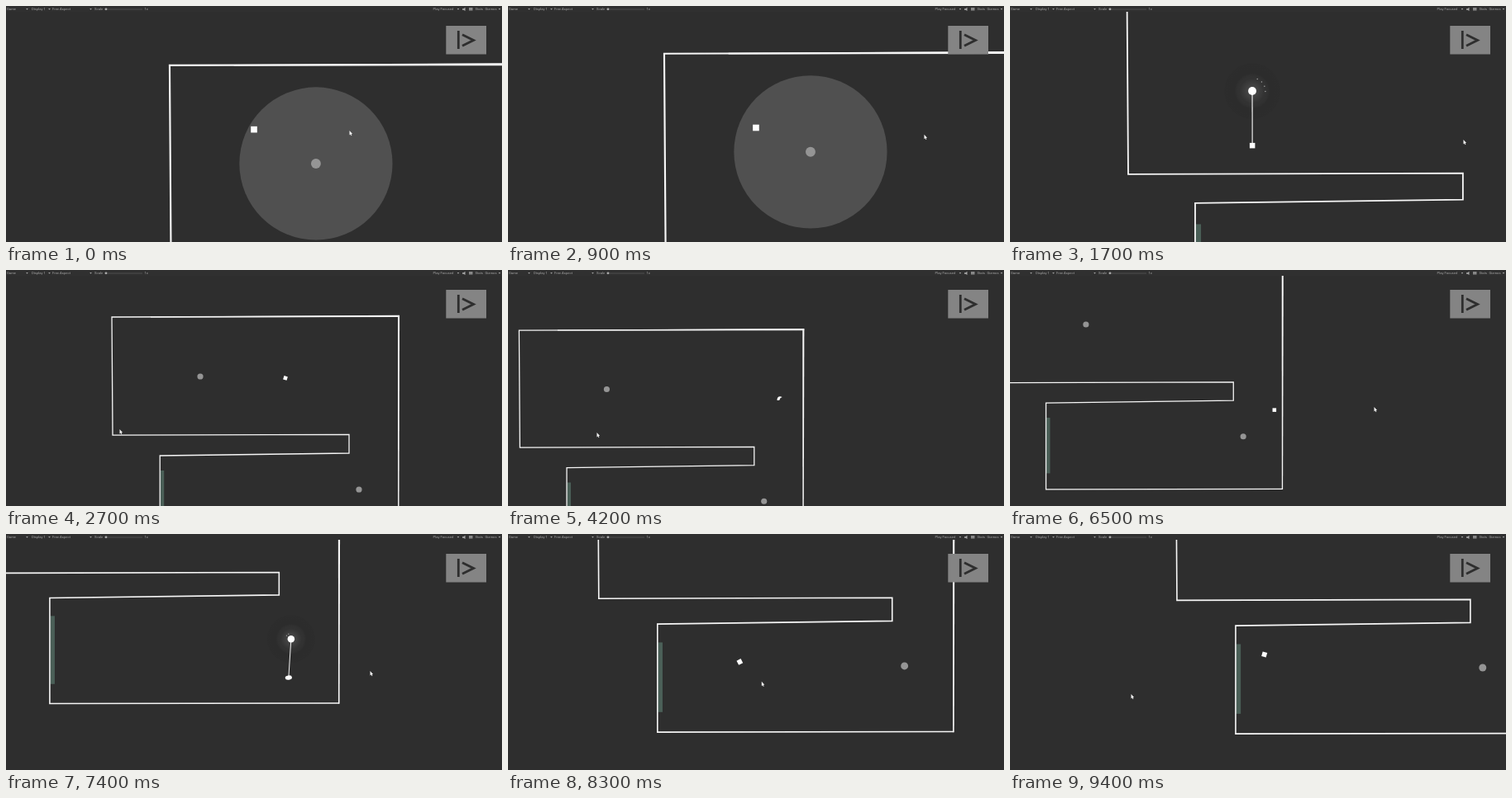
An HTML page with a canvas for the animation above (9.5 s loop, 600 px wide and 286 px high).

```html
<!DOCTYPE html>
<html lang="en">
<head>
<meta charset="utf-8">
<title>Swing</title>
<style>
  html, body { margin: 0; width: 100%; height: 100%; overflow: hidden; background: #2e2e2e; }
  canvas { display: block; }
</style>
</head>
<body>
<canvas id="stage" width="600" height="286"></canvas>
<script>
const ctx = document.getElementById('stage').getContext('2d');
const LOOP = 9500, STEP = 100, BAR = 7;
const CENTER = { x: 300, y: 146.5 };
const BG = '#2e2e2e', WHITE = '#f6f6f6', GREY = '#959595';
const WALL = { left: -44, right: 230 };
const GRAVITY = 18;

// Each anchor swings the player from one angle (degrees) and rope length to another.
const anchors = [
  { x: 0, y: 0, from: 1.1, to: 2, angle: [200, 12], rope: [41, 53.8], power: 1.32, sparks: 4 },
  { x: 192, y: 137, from: 6.7, to: 7.65, angle: [-27.6, 163], rope: [42.9, 35.2], power: 1.48, sparks: 2 }
];

// Key points: [seconds, x, y]
const cameraPath = [
  [0, -45.3, -26.9], [1, -38.8, -16.7], [1.7, 4.9, 30.7], [2.7, 65, 17.5], [4.2, 182.2, 2],
  [5, 207, 21], [6.5, 210, 81.2], [7.4, 155, 152.9], [8, 72.8, 127], [9.4, -27, 124.5]
];
const cursorPath = [
  [0, 416, 152], [1.7, 549, 163], [2.7, 138, 194], [4.2, 108, 198],
  [6.5, 441, 167], [7.4, 441, 167], [9, 147, 195]
];

const clamp01 = v => Math.min(1, Math.max(0, v));
const lerp = ([a, b], u) => a + (b - a) * u;
const smooth = (t, from, to) => {
  const u = clamp01((t - from) / (to - from));
  return u * u * (3 - 2 * u);
};

// Monotone cubic through the key points
function follow(path, t) {
  const last = path.length - 1;
  let i = 0;
  while (i < last - 1 && t >= path[i + 1][0]) i++;
  const slope = (n, c) => (path[n + 1][c] - path[n][c]) / (path[n + 1][0] - path[n][0]);
  const tangent = (n, c) => {
    const p = slope(Math.max(0, n - 1), c), q = slope(Math.min(n, last - 1), c);
    return p * q <= 0 ? 0 : 2 * p * q / (p + q);
  };
  const a = path[i], b = path[i + 1], h = b[0] - a[0];
  const u = clamp01((t - a[0]) / h), w = 1 - u;
  return [1, 2].map(c => a[c] * w * w * (1 + 2 * u) + b[c] * u * u * (3 - 2 * u)
    + h * u * w * (w * tangent(i, c) - u * tangent(i + 1, c)));
}

const zoomAt = t => 1.654 - 0.663 * smooth(t, 0.93, 2.83) + 0.25 * smooth(t, 6.5, 7.64);
const arc = (t, apexTime, apexY) => apexY + GRAVITY / 2 * (t - apexTime) ** 2;
const isHeld = (a, t) => t >= a.from && t < a.to;

function swing(a, t) {
  const u = (t - a.from) / (a.to - a.from);
  const angle = lerp(a.angle, u ** a.power) * Math.PI / 180;
  const rope = lerp(a.rope, u * u);
  return [a.x + rope * Math.cos(angle), a.y + rope * Math.sin(angle)];
}

function playerAt(t) {
  const [first, second] = anchors;
  const held = anchors.find(a => isHeld(a, t));
  if (held) return swing(held, t);
  if (t < first.from) return [-45.3 + 6 * t, arc(t, 0, -25)];
  if (t < second.from) return [Math.min(WALL.right, 103 + 72 * (t - 2.7)), arc(t, 3.1, 0.5)];
  const bounce = 9;
  const left = clamp01((bounce - t) / (bounce - second.to));
  const x = t < bounce ? lerp([WALL.left, 158], left ** 1.5) : WALL.left + 58 * (t - bounce);
  return [x, arc(t, 9.3, 124)];
}

function fillPath(points, fill) {
  ctx.fillStyle = fill;
  ctx.beginPath();
  points.forEach(([x, y]) => ctx.lineTo(x, y));
  ctx.fill();
}

function stroke(points, width, color) {
  ctx.strokeStyle = color;
  ctx.lineWidth = width;
  ctx.beginPath();
  points.forEach(([x, y]) => ctx.lineTo(x, y));
  ctx.stroke();
}

function disc(x, y, r, fill, ry = r, tilt = 0) {
  ctx.fillStyle = fill;
  ctx.beginPath();
  ctx.ellipse(x, y, r, ry, tilt, 0, 7);
  ctx.fill();
}

function drawRoom() {
  ctx.fillStyle = '#4a5f57';
  ctx.fillRect(-48.5, 114, 4.7, 68);
  stroke([[240, -73], [-107, -72], [-106, 71.2], [180, 70.4], [180, 93],
    [-48.8, 96], [-48.8, 201.6], [240, 201.1]], 1.3, WHITE);
  // The top and right walls widen toward their shared corner
  fillPath([[-60, -72.6], [241, -74.2], [241, -72], [-60, -71.6]], WHITE);
  fillPath([[239, -74], [241.1, -74], [240.4, 201.7], [239.1, 201.7]], WHITE);
}

function drawRange(t) {
  const shrink = clamp01((t - 1) / 0.25);
  disc(0, 0, 56 - 30 * shrink, `rgba(255,255,255,${0.16 * (1 - shrink)})`);
}

function drawAnchor(a, t, player) {
  if (!isHeld(a, t)) {
    disc(a.x, a.y, 3.6, GREY);
    return;
  }
  const glow = 24;
  const halo = ctx.createRadialGradient(a.x, a.y, 2, a.x, a.y, glow);
  halo.addColorStop(0, 'rgba(255,255,255,.13)');
  halo.addColorStop(0.4, 'rgba(255,255,255,.02)');
  halo.addColorStop(0.6, 'rgba(0,0,0,.05)');
  halo.addColorStop(1, 'rgba(0,0,0,.03)');
  disc(a.x, a.y, glow, halo);
  stroke([[a.x, a.y], player], 0.8, WHITE);
  disc(a.x, a.y, 3.5, '#fff');
  // Sparks fly off on the side opposite the swing
  const side = Math.sign(a.angle[0] - a.angle[1]);
  for (let i = 0; i < a.sparks; i++) {
    const angle = -Math.PI / 2 + side * 0.4 * (i + 1) * (t - a.from) / 0.6;
    const r = 2.8 * a.sparks;
    disc(a.x + r * Math.cos(angle), a.y + r * Math.sin(angle), 0.5, '#aaa');
  }
}

function drawPlayer(t, [x, y]) {
  ctx.save();
  ctx.translate(x, y);
  if (t > 4 && t < 4.4) {
    // Half-turned sliver
    ctx.fillStyle = '#fff';
    ctx.beginPath();
    ctx.moveTo(-3, 2.2);
    ctx.bezierCurveTo(-3.5, -2, 0, -4, 3.2, -1.8);
    ctx.quadraticCurveTo(0.3, -1, -0.2, 2);
    ctx.fill();
  } else if (isHeld(anchors[1], t)) {
    disc(0, 0, 3.4, '#fff', 2.2, -0.15);
  } else {
    const airborne = (t > 2 && t < 4.4) || t > 7.6;
    if (airborne) ctx.rotate(0.3 + (t - 2.7) * 0.7);
    ctx.fillStyle = '#fff';
    ctx.fillRect(-2.3, -2.3, 4.6, 4.6);
  }
  ctx.restore();
}

function drawCursor([x, y]) {
  ctx.save();
  ctx.translate(x, y);
  fillPath([[-0.5, -1], [-0.5, 4.4], [0.7, 3.5], [1.6, 5.2], [2.4, 4.8], [1.6, 3.1], [3.1, 2.9]], '#f0f0f0');
  ctx.restore();
}

function drawToolbar() {
  ctx.fillStyle = '#303030';
  ctx.fillRect(0, 0, 600, BAR);
  ctx.fillStyle = '#a4a4a4';
  ctx.font = '4.2px Roboto, Arial, sans-serif';
  const labels = { 'Game': 1, 'Display 1': 31, 'Free Aspect': 56, 'Scale': 107,
    '1x': 167.5, 'Play Focused': 516.5, 'Stats': 567.5, 'Gizmos': 579.5 };
  for (const [text, x] of Object.entries(labels)) ctx.fillText(text, x, 5.3);
  for (const x of [25.5, 52.5, 102.5, 547, 597]) {
    fillPath([[x - 1.3, 3], [x + 1.3, 3], [x, 4.7]], '#a4a4a4');
  }
  stroke([[119, 4], [165, 4]], 0.7, '#5c5c5c');
  disc(121, 3.8, 1.4, '#aaa');
  fillPath([[552, 3.2], [553.5, 3.2], [555.5, 1.8], [555.5, 6], [553.5, 4.8], [552, 4.8]], '#aaa');
  ctx.fillStyle = '#888';
  ctx.fillRect(560, 2, 4.5, 3.5);
}

function drawSpeedButton() {
  ctx.fillStyle = '#848484';
  ctx.fillRect(532.3, 24, 48.7, 34.5);
  stroke([[547.3, 30], [547.3, 52]], 2.8, BG);
  stroke([[552, 34.8], [565.5, 41.5], [552, 48.2]], 2.9, BG);
}

function draw(ms) {
  const t = Math.floor(ms % LOOP / STEP) * STEP / 1000;
  const player = playerAt(t), zoom = zoomAt(t);
  const [camX, camY] = follow(cameraPath, t);
  ctx.fillStyle = BG;
  ctx.fillRect(0, 0, 600, 286);
  ctx.save();
  ctx.translate(CENTER.x, CENTER.y);
  ctx.scale(zoom, zoom);
  ctx.translate(-camX, -camY);
  drawRange(t);
  drawRoom();
  anchors.forEach(a => drawAnchor(a, t, player));
  drawPlayer(t, player);
  ctx.restore();
  drawToolbar();
  drawSpeedButton();
  drawCursor(follow(cursorPath, t));
}

const start = performance.now();
function tick() {
  draw(performance.now() - start);
  requestAnimationFrame(tick);
}
tick();
</script>
</body>
</html>
```
